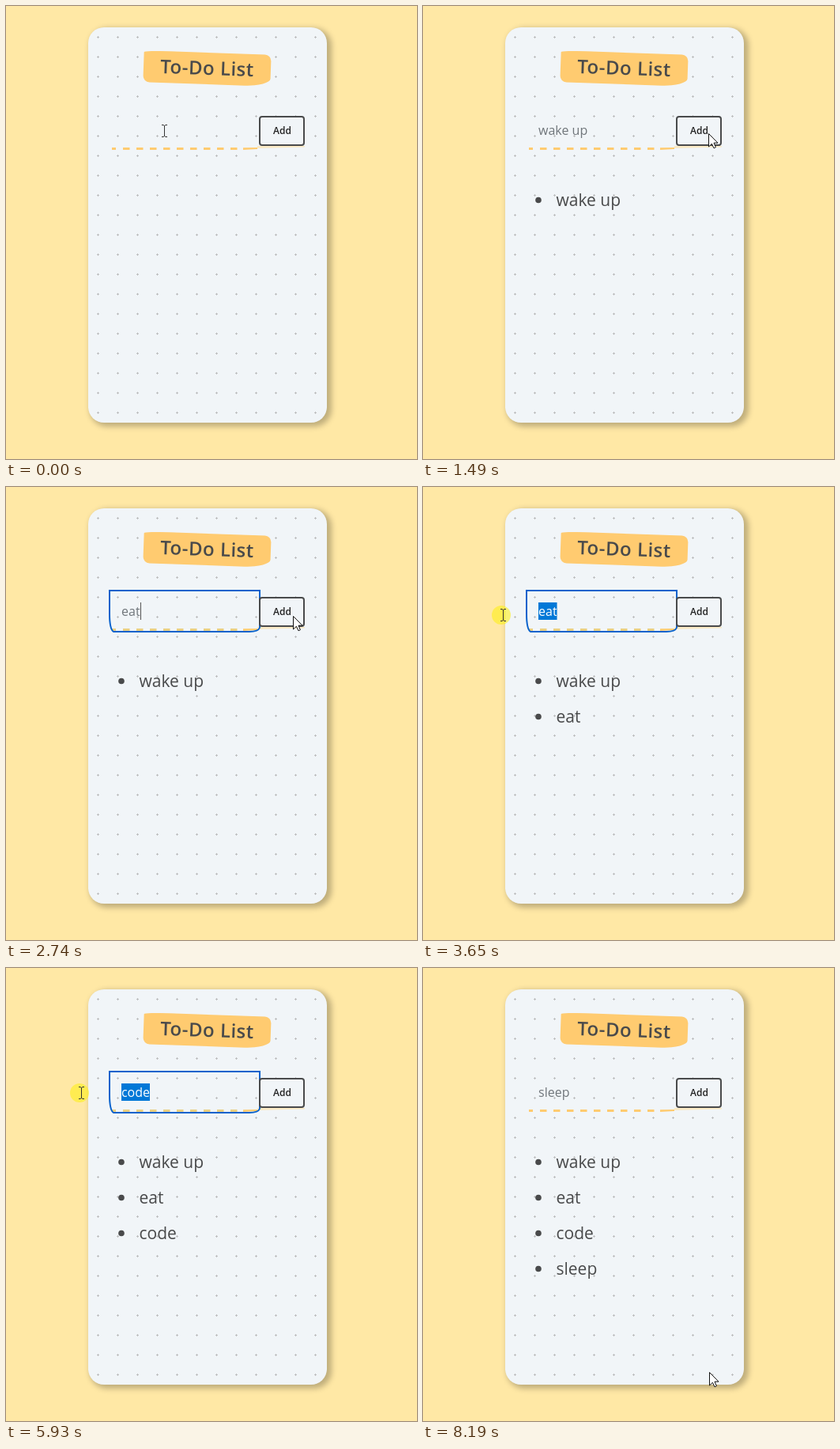
Write an HTML page that moves like this. It is 520 by 573 pixels and loops after 8.26 s.

```html
<!DOCTYPE html>
<html lang="en">
<head>
<meta charset="utf-8">
<title>To-Do List</title>
<style>
  html, body { margin: 0; width: 100%; height: 100%; overflow: hidden; background: #ffe8a5; }
  body { position: relative; font-family: "Open Sans", sans-serif; color: #494a4b; }
  .card {
    position: absolute; left: 104px; top: 27px; width: 302px; height: 500px;
    border-radius: 20px; background: #f1f5f8 radial-gradient(#bfc0c1 7.2%, transparent 0) 0 0 / 25px 25px;
    box-shadow: 4px 3px 7px 2px #00000040;
  }
  h1 {
    position: absolute; left: 173.5px; top: 59px; width: 161px; height: 39.5px; margin: 0;
    font: 600 24px/38px "Open Sans", sans-serif; letter-spacing: .5px; text-align: center; white-space: nowrap;
    background: #ffcb70; border-radius: 20% 5% 20% 5% / 5% 20% 25% 20%; transform: rotate(2deg);
  }
  svg { position: absolute; left: 0; top: 0; }
  text { fill: #494a4b; font-size: 21px; }
  .value { font-size: 16px; fill: #70767b; }
  #picked .value { fill: #fff; }
  .button { font-size: 12px; font-weight: 600; fill: #222; text-anchor: middle; }
</style>
</head>
<body>
<div class="card"></div>
<h1>To-Do List</h1>
<svg width="520" height="573" viewBox="0 0 520 573">
  <clipPath id="range"><rect id="rangeBox" y="146" height="22"/></clipPath>
  <g id="line" fill="none" stroke="#ffcb70" stroke-width="3">
    <path d="M134 180.5H139"/>
    <path d="M148 180.5H301" stroke-dasharray="8.5 8.5"/>
    <path d="M300 179.2L318 179V181L300 182Z" fill="#ffcb70" stroke="none"/>
  </g>
  <path d="M318 177H378V178.5L318 180Z" fill="#f9e9c4"/>
  <path id="outline" d="M131 131H321V178Q319 183 308 183H136Q131 180 131 160Z" fill="none" stroke="#0862cc" stroke-width="2"/>
  <rect x="321" y="140" width="56" height="36" rx="3" fill="#f1f5f8" stroke="#494a4b" stroke-width="2"/>
  <text class="button" x="349.5" y="162">Add</text>
  <text class="value" id="value" x="146" y="163"></text>
  <g id="picked" clip-path="url(#range)">
    <rect x="146" y="146" width="175" height="22" fill="#0078d7"/>
    <text class="value" id="pickedText" x="146" y="163"></text>
  </g>
  <rect id="caret" y="146" width="1" height="22" fill="#555"/>
  <g id="list"></g>
  <g id="pointer">
    <circle id="press" r="12" fill="#fff014" fill-opacity=".58"/>
    <path id="beam" d="M-3 -7.5H-1L.5 -6.5L2 -7.5H4M.5 -6.5V6.5M-3 7.5H-1L.5 6.5L2 7.5H4" fill="none" stroke="#333"/>
    <path id="arrow" d="M.5 .5V17L4.4 13.3L7 18.8L9.4 17.7L7 12.2H12Z" fill="#fff" stroke="#111"/>
  </g>
</svg>
<script>
const LOOP = 8260, TICK = 70;
const MOVE = 350, RETURN = 420, DRAG = 210, HOLD = 100;
const HOME = [206, 158], EXIT = [362, 511];

// Each round: grab the field, drag to select, type the word, travel to the button, click.
const rounds = [
  { word: "wake up", grab: 130, type: 270, typed: 930, arrive: 1280, click: 1330, dragTo: [200, 158], button: [361, 161], sway: [0, 0] },
  { word: "eat", grab: 2050, type: 2400, typed: 2600, arrive: 2740, click: 2870, dragTo: [119, 159], button: [363, 163], sway: [0, 0] },
  { word: "code", grab: 3510, type: 3860, typed: 4260, arrive: 4820, click: 4890, dragTo: [88, 162], button: [342, 164], sway: [0, 50] },
  { word: "sleep", grab: 5650, type: 6070, typed: 6680, arrive: 7230, click: 7230, dragTo: [95, 158], button: [329, 170], sway: [190, -10] }
];
rounds.forEach(r => r.leave = Math.max(r.typed, r.arrive - MOVE));

const el = id => document.getElementById(id);
const show = (node, on) => node.setAttribute("visibility", on ? "visible" : "hidden");
const within = (t, from, to) => t >= from && t < to;
const easeOut = k => k * (2 - k);

function progress(t, from, duration) {
  const ticked = Math.floor((t - from) / TICK) * TICK;
  return Math.min(1, Math.max(0, ticked / duration));
}

function between(a, b, k, sway = [0, 0]) {
  return a.map((v, i) => v + (b[i] - v) * k + sway[i] * Math.sin(Math.PI * k));
}

function pointerAt(t, r, next) {
  if (t < r.grab) return r.dragTo;
  if (t < r.leave) {
    const start = r === rounds[0] ? r.dragTo : HOME;
    return between(start, r.dragTo, easeOut(progress(t, r.grab, DRAG)));
  }
  if (t < r.click) return between(r.dragTo, r.button, progress(t, r.leave, r.arrive - r.leave), r.sway);
  return next
    ? between(r.button, HOME, progress(t, next.grab - RETURN, RETURN))
    : between(r.button, EXIT, progress(t, 7630, 560));
}

function wordAt(t, r, previous) {
  if (t < r.type) return previous ? previous.word : "";
  const letters = 1 + (t - r.type) / (r.typed - r.type) * (r.word.length - 1);
  return r.word.slice(0, Math.floor(letters));
}

const rows = rounds.map(({ word }, i) => {
  const row = document.createElementNS("http://www.w3.org/2000/svg", "g");
  row.innerHTML = `<circle cx="146" cy="${245.5 + i * 45}" r="3.8" fill="#494a4b"/>
    <text x="168.5" y="${252.5 + i * 45}">${word}</text>`;
  return el("list").appendChild(row);
});

function draw(t) {
  const index = Math.max(0, rounds.findLastIndex(r => r.grab <= t));
  const r = rounds[index], previous = rounds[index - 1];
  const [x, y] = pointerAt(t, r, rounds[index + 1]);
  const focus = within(t, r.grab, r.click);
  const select = Boolean(previous) && within(t, r.grab, r.type);

  const value = wordAt(t, r, previous);
  el("value").textContent = el("pickedText").textContent = value;
  const end = 146 + (value ? el("value").getComputedTextLength() : 0);
  const start = Math.min(end, Math.max(146, x));
  el("rangeBox").setAttribute("x", start);
  el("rangeBox").setAttribute("width", end - start);
  el("caret").setAttribute("x", Math.round(end));
  el("line").setAttribute("stroke", focus ? "#e8cf83" : "#ffcb70");
  show(el("picked"), select);
  show(el("outline"), focus);
  show(el("caret"), focus && !select);
  rows.forEach((row, i) => show(row, t >= rounds[i].click + HOLD));

  const visible = !within(t, r.type, r.leave);
  const overInput = x > 130 && x < 321 && y > 131 && y < 183;
  const beam = select || overInput;
  const pressing = within(t, r.grab, r.type) || within(t, r.click, r.click + HOLD);
  el("pointer").setAttribute("transform", `translate(${Math.round(x)} ${Math.round(y)})`);
  el("press").setAttribute("cx", beam ? -2 : 0);
  show(el("press"), visible && pressing);
  show(el("beam"), visible && beam);
  show(el("arrow"), visible && !beam);
}

const began = performance.now();
function frame() {
  draw((performance.now() - began) % LOOP);
  requestAnimationFrame(frame);
}
frame();
</script>
</body>
</html>
```
